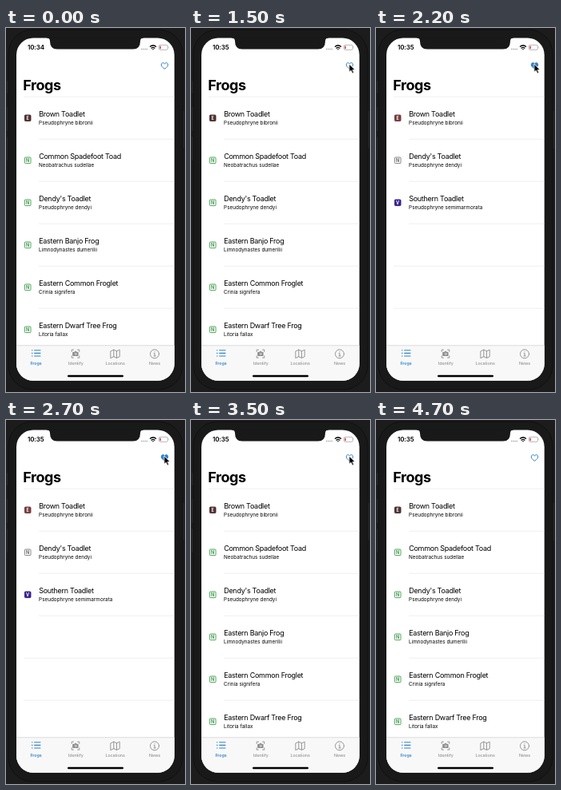
Animation, 224 px wide and 456 px high, one loop 4.8 s. Source, as an HTML page:

```html
<!DOCTYPE html>
<html lang="en">
<head>
<meta charset="utf-8">
<title>Frog list</title>
<style>
html, body { margin: 0; width: 100%; height: 100%; overflow: hidden; background: #1c1c1d; }
svg { display: block; width: 224px; height: 456px; font-family: Inter, "Liberation Sans", sans-serif; }
.time { font-size: 8px; font-weight: 600; letter-spacing: -.15px; }
.title { font-size: 18px; font-weight: 700; letter-spacing: -.45px; }
.name { font-size: 9px; letter-spacing: -.28px; }
.latin { font-size: 6.3px; letter-spacing: .03px; }
.letter { font-size: 5.6px; font-weight: 700; text-anchor: middle; }
.tab { font-size: 5.3px; font-weight: 500; letter-spacing: -.04px; text-anchor: middle; fill: #929292; }
.tab.on { fill: #2f83cb; font-weight: 600; }
.rule { stroke: #e4e4e4; stroke-width: .6; }
.icon { fill: none; stroke: #8c8c8c; stroke-width: .9; stroke-linejoin: round; stroke-linecap: round; }
.heart { fill: none; stroke: #2f83cb; stroke-width: 1; }
.heart.saved { fill: #2f83cb; }

.early, .late, .all, .saved, .press, .cursor { animation: 4.8s step-end infinite; }
.early { animation-name: early; }
.late { animation-name: late; }
.all { animation-name: all; }
.saved { animation-name: saved; }
.press { animation-name: press; }
.cursor { animation-name: cursor; }
@keyframes early { 0% { opacity: 1 } 22.916%, 100% { opacity: 0 } }
@keyframes late { 0% { opacity: 0 } 22.916%, 100% { opacity: 1 } }
@keyframes all { 0% { opacity: 1 } 39.583% { opacity: 0 } 70.833%, 100% { opacity: 1 } }
@keyframes saved { 0% { opacity: 0 } 39.583% { opacity: 1 } 70.833%, 100% { opacity: 0 } }
@keyframes press {
  0% { opacity: 0 } 35.416% { opacity: 1 } 39.583% { opacity: 0 }
  64.583% { opacity: 1 } 70.833%, 100% { opacity: 0 }
}
@keyframes cursor {
  0% { visibility: hidden; transform: translate(213px, 114px) }
  12.499% { visibility: visible; transform: translate(213px, 114px) }
  14.583% { visibility: visible; transform: translate(213px, 114px); animation-timing-function: steps(4) }
  22.916% { visibility: visible; transform: translate(197.8px, 45px) }
  74.999% { visibility: visible; transform: translate(197.8px, 45px); animation-timing-function: steps(4) }
  83.333% { visibility: visible; transform: translate(104.3px, 8px) }
  85.416%, 100% { visibility: hidden; transform: translate(104.3px, 8px) }
}
</style>
</head>
<body>
<svg viewBox="0 0 224 456">
  <!-- phone body -->
  <g fill="#272728">
    <rect x="1" y="66" width="3" height="16" rx="1"/>
    <rect x="1" y="99" width="3" height="30" rx="1"/>
    <rect x="1" y="136" width="3" height="30" rx="1"/>
    <rect x="220" y="104" width="3" height="47" rx="1"/>
  </g>
  <rect x="3" y="2" width="218" height="451" rx="30" fill="#19191a" stroke="#101011"/>
  <rect x="13" y="12.5" width="197.7" height="429.3" rx="21" fill="#fff"/>
  <path d="M51 11.5V12.5q4 0 4 4 0 10 9 10h95q9 0 9-10 0-4 4-4v-1z" fill="#19191a"/>

  <!-- status bar -->
  <g class="time">
    <text class="early" x="27" y="27.3">10:34</text>
    <text class="late" x="27" y="27.3">10:35</text>
  </g>
  <path d="M169 26.5h8" stroke="#a5a5a5" stroke-width="1.3" stroke-dasharray="1.3 .95"/>
  <g fill="none" stroke="#000" stroke-width="1.3">
    <path d="M180 23.6q4-3.6 8 0M181.6 25.4q2.4-2 4.8 0"/>
    <path d="M182.9 26.2h2.2l-1.1 1.5z" fill="#000" stroke="none"/>
  </g>
  <rect x="191.3" y="21.3" width="11.2" height="6" rx="1.7" fill="none" stroke="#999" stroke-width=".7"/>
  <path d="M203.4 23.3q1 .9 0 2z" fill="#999"/>
  <rect x="192.4" y="22.4" width="1.5" height="3.8" rx=".7" fill="#d9363c"/>

  <!-- header -->
  <defs>
    <path id="heart" d="M198.5 51.3C195.2 49 194.3 47.5 194.3 46c0-2.8 3.3-3.2 4.2-.8.9-2.4 4.2-2 4.2.8 0 1.5-.9 3-4.2 5.3z"/>
  </defs>
  <use href="#heart" class="heart all"/>
  <use href="#heart" class="heart saved"/>
  <text class="title" x="21.2" y="78">Frogs</text>
  <path class="rule" d="M22 86.2H210.7"/>

  <g id="all" class="all"></g>
  <g id="saved" class="saved"></g>

  <!-- tab bar -->
  <path d="M13 397.5H210.7V420.8a21 21 0 0 1-21 21H34a21 21 0 0 1-21-21z" fill="#f8f8f8"/>
  <path d="M13 397.7H210.7" stroke="#c9c9c9" stroke-width=".6"/>
  <path d="M32 403.8h1.4m1.8 0h8.2M32 407.4h1.4m1.8 0h8.2M32 411h1.4m1.8 0h8.2" stroke="#2f83cb" stroke-width="1.1"/>
  <g class="icon">
    <path d="M82.2 405.4v-2.3h2.3m5 0h2.3v2.3m0 5.4v2.3h-2.3m-5 0h-2.3v-2.3"/>
    <path d="M84 406.3h1.6l.7-1h1.6l.7 1h1.5v4.2H84z" fill="#8c8c8c"/>
    <circle cx="87.1" cy="408.3" r="1.1" stroke="#f8f8f8" stroke-width=".6"/>
    <path d="M131.2 404.8l3.6-1.7 3.7 1.7 3.7-1.7v8.6l-3.7 1.7-3.7-1.7-3.6 1.7zM134.8 403.1v8.6M138.5 404.8v8.6"/>
    <circle cx="186" cy="408.3" r="5.5"/>
    <path d="M185.2 407.4h.9v3.5m-1.1 0h2.2M186 405.4v.1"/>
  </g>
  <text class="tab on" x="37.5" y="421.8">Frogs</text>
  <text class="tab" x="87.2" y="421.8">Identify</text>
  <text class="tab" x="136.6" y="421.8">Locations</text>
  <text class="tab" x="186" y="421.8">News</text>
  <rect x="77" y="434.7" width="70" height="2.6" rx="1.3"/>

  <circle class="press" cx="199" cy="46.8" r="14.6" fill="none" stroke="#000" stroke-width="1.2"/>
  <g class="cursor">
    <path d="M0 0V10.3L2.4 8.2 4.1 12 6 11.2 4.4 7.5H7.6z" stroke="#fff" stroke-width=".9" stroke-linejoin="round"/>
  </g>
</svg>
<script>
const PITCH = 53;
const frogs = [
  ["E", "Brown Toadlet", "Pseudophryne bibronii"],
  ["N", "Common Spadefoot Toad", "Neobatrachus sudellae"],
  ["N", "Dendy's Toadlet", "Pseudophryne dendyi"],
  ["N", "Eastern Banjo Frog", "Limnodynastes dumerilii"],
  ["N", "Eastern Common Froglet", "Crinia signifera"],
  ["N", "Eastern Dwarf Tree Frog", "Litoria fallax"]
];
const favourites = [frogs[0], frogs[2], ["V", "Southern Toadlet", "Pseudophryne semimarmorata"]];

// status letter: [fill, border, text]
const allColors = { E: ["#4b2d2e", "#4b2d2e", "#fff"], N: ["#fff", "#3a9a48", "#3a9a48"] };
const savedColors = {
  E: ["#74383a", "#74383a", "#fff"],
  N: ["#fff", "#777", "#666"],
  V: ["#37208c", "#37208c", "#fff"]
};

const rule = (x, i) => `<path class="rule" d="M${x} ${86.2 + PITCH * i}H210.7"/>`;

function row([status, name, latin], i, colors) {
  const [fill, border, ink] = colors[status];
  return `<g transform="translate(0 ${PITCH * i})">
    <rect x="23.4" y="109" width="7.6" height="7.6" rx="1" fill="${fill}" stroke="${border}" stroke-width=".9"/>
    <text class="letter" x="27.2" y="114.9" fill="${ink}">${status}</text>
    <text class="name" x="41.2" y="110.8">${name}</text>
    <text class="latin" x="41.1" y="120.8">${latin}</text>
  </g>`;
}

function fill(id, list, colors) {
  let html = list.map((frog, i) => row(frog, i, colors)).join("");
  for (let i = 1; i < 6; i++) html += rule(i <= list.length ? 41 : 22, i);
  document.getElementById(id).innerHTML = html;
}

fill("all", frogs, allColors);
fill("saved", favourites, savedColors);
</script>
</body>
</html>
```
